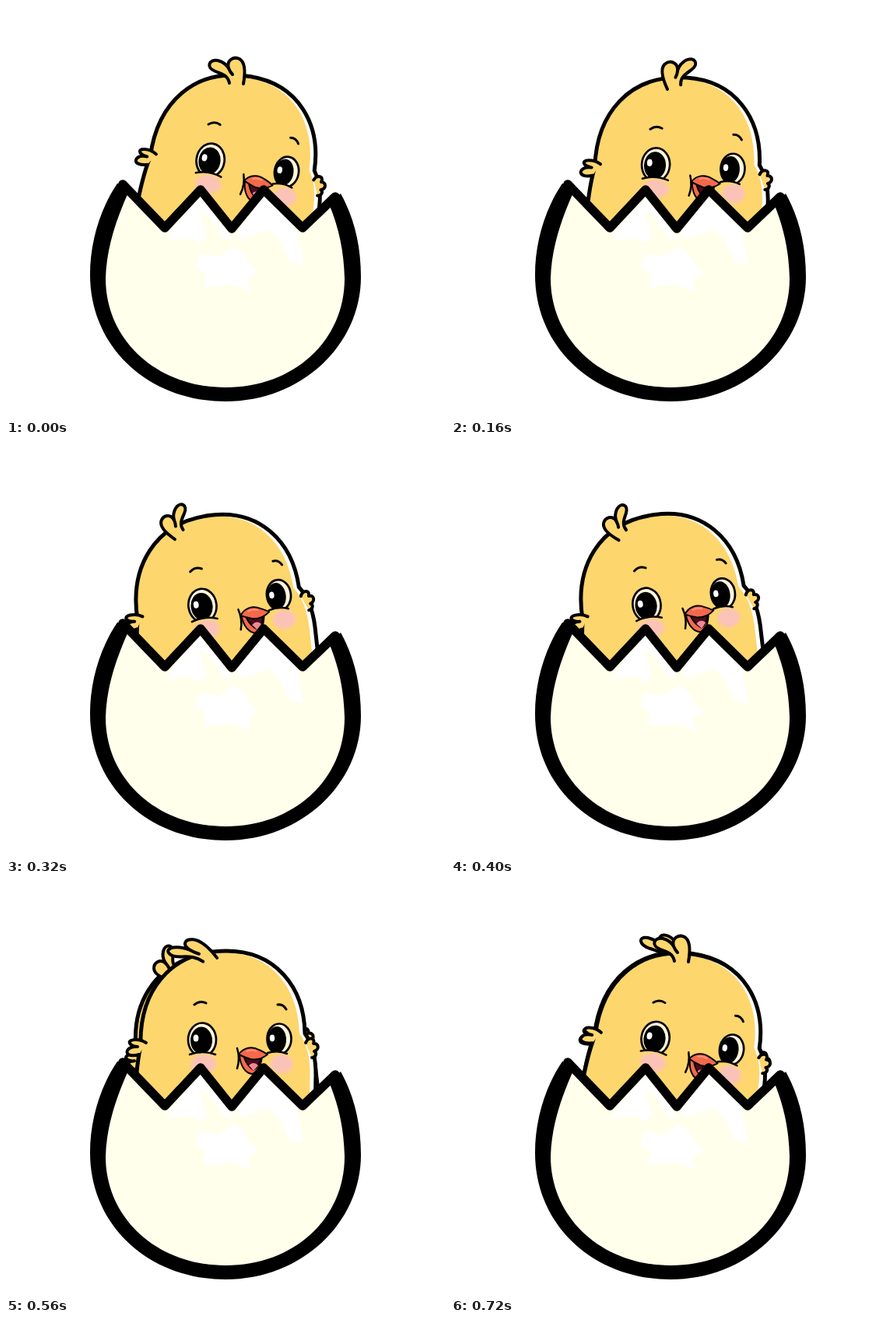
These frames come from a looping animation (564x528 px, 0.76 s). An HTML page without scripts:

```html
<!DOCTYPE html>
<html lang="en">
<head>
<meta charset="utf-8">
<title>Hatching chick</title>
<style>
  html, body { margin: 0; width: 100%; height: 100%; overflow: hidden; background: #fff; }
  svg { display: block; width: 100vw; height: 100vh; }
  .line { fill: none; stroke: #000; stroke-linecap: round; stroke-linejoin: round; }
  .feather { fill: #fed66e; stroke: #000; stroke-width: 4; stroke-linecap: round; stroke-linejoin: round; }
  .feather path { vector-effect: non-scaling-stroke; }

  /* Returning poses linger behind the next one for a moment. */
  .pose { visibility: hidden; animation: plain 760ms step-end calc(var(--at) - 760ms) infinite; }
  .linger { animation-name: linger; }
  .last { animation-name: last; }
  @keyframes plain { 0% { visibility: visible } 10.5263%, 100% { visibility: hidden } }
  @keyframes linger { 0% { visibility: visible } 15.7895%, 100% { visibility: hidden } }
  @keyframes last { 0% { visibility: visible } 5.2632%, 100% { visibility: hidden } }
</style>
</head>
<body>
<svg viewBox="0 0 564 528">
  <defs>
    <radialGradient id="blush">
      <stop offset=".6" stop-color="#fbc3b8"/>
      <stop offset="1" stop-color="#fbc3b8" stop-opacity="0"/>
    </radialGradient>

    <path id="outline" d="M-136 100C-134 50-133 30-128 8C-130-60-92-114-18-114C45-114 82-68 83-8C92 5 97 20 97 45L96 100Z"/>

    <!-- Body and face share the midpoint between the eyes as origin. -->
    <g id="body">
      <use href="#outline" fill="#fff"/>
      <use href="#outline" fill="#fed66e" transform="translate(-4.2) scale(.967 .985)"/>
      <use href="#outline" class="line" stroke-width="5"/>
      <g class="feather" stroke-width="3.5">
        <path d="M-121 4C-130-2-147-1-141 6Q-137 9-132 9C-145 8-150 18-141 20Q-136 21-130 19"/>
        <path d="M84 4C87-4 97-3 94 5C101 4 102 13 95 15C99 17 97 23 92 23"/>
      </g>
    </g>

    <g id="tuft" class="feather">
      <path d="M-10 2C-12-8-20-10-28-13C-41-18-36-29-25-27Q-16-25-11-17C-14-27-5-33 3-29C10-25 11-14 8 3"/>
      <path d="M-11-17Q-9-12-6-9" fill="none"/>
    </g>

    <g id="face">
      <path class="line" stroke-width="3" d="M-59-45Q-52-51-44-47M48-45Q55-46 59-39"/>
      <g id="eyes">
        <ellipse cx="-49" cy="0" rx="18" ry="21.5" fill="#fff6dc" stroke="#000" stroke-width="2.7"/>
        <ellipse cx="-50" cy="1" rx="14" ry="17.5"/>
        <ellipse cx="-57" cy="-2" rx="3.4" ry="4.6" fill="#fff"/>
        <ellipse cx="50" cy="-1" rx="15.5" ry="19.5" fill="#fff6dc" stroke="#000" stroke-width="2.7"/>
        <ellipse cx="47" cy="0" rx="12" ry="17"/>
        <ellipse cx="41" cy="-2" rx="3.2" ry="4.4" fill="#fff"/>
      </g>
      <path d="M-66 20Q-49 14-31 20V27H-64ZM33 19Q48 13 64 18V27H34Z" fill="#fed66e"/>
      <ellipse cx="-47" cy="31" rx="20" ry="15" fill="url(#blush)"/>
      <ellipse cx="53" cy="31" rx="18" ry="15" fill="url(#blush)"/>
      <path class="line" stroke-width="2.5" d="M-65 19Q-49 13-32 19M35 17Q48 13 60 18"/>
      <g stroke="#000" stroke-width="2" stroke-linejoin="round">
        <path d="M-1 20C0 33 6 43 15 44Q25 42 28 22Z" fill="#f4694b"/>
        <path d="M5 23Q9 34 17 39Q25 34 27 22Z" fill="#4c0c18"/>
        <path d="M11 33Q17 27 23 33L17 40Z" fill="#ef8998" stroke="none"/>
        <path d="M-2 19C4 10 15 8 24 13Q31 16 35 19Q25 27 13 25Q4 22-2 19Z" fill="#f4694b"/>
        <path d="M8 15Q14 12 21 15" fill="none" stroke="#fb927a"/>
      </g>
      <path class="line" stroke-width="2.5" d="M-4 11Q0 24-4 37"/>
    </g>
  </defs>

  <g class="pose" style="--at:0ms">
    <use href="#body" transform="translate(313 206) rotate(9.3)"/>
    <use href="#tuft" transform="translate(297 97)"/>
    <use href="#face" transform="translate(311 206) rotate(9.3)"/>
  </g>
  <g class="pose" style="--at:80ms">
    <use href="#body" transform="translate(313 206) rotate(7.5)"/>
    <use href="#tuft" transform="translate(292 98) rotate(28)"/>
    <use href="#face" transform="translate(312 206) rotate(7.5)"/>
  </g>
  <g class="pose" style="--at:160ms">
    <use href="#body" transform="translate(313 207) rotate(3.7)"/>
    <use href="#tuft" transform="translate(285 102) rotate(-15) scale(-1 1)"/>
    <use href="#face" transform="translate(312 207) rotate(3.7)"/>
  </g>
  <g class="pose" style="--at:240ms">
    <use href="#body" transform="translate(304 203) rotate(-2.5)"/>
    <use href="#tuft" transform="translate(249 104) rotate(-31) scale(-.95 .95)"/>
    <use href="#face" transform="translate(307 203) rotate(-2.5)"/>
  </g>
  <g class="pose" style="--at:320ms">
    <use href="#body" transform="translate(295 201) rotate(-7.3)"/>
    <use href="#tuft" transform="translate(220 114) rotate(-46) scale(-.9 .9)"/>
    <use href="#face" transform="translate(301 200) rotate(-7.3)"/>
  </g>
  <g class="pose linger" style="--at:400ms">
    <use href="#body" transform="translate(295 200) rotate(-7.8)"/>
    <use href="#tuft" transform="translate(218 115) rotate(-51) scale(-.9 .9)"/>
    <use href="#face" transform="translate(300 198.5) rotate(-7.8)"/>
  </g>
  <g class="pose linger" style="--at:480ms">
    <use href="#body" transform="translate(294.5 200) rotate(-8)"/>
    <use href="#tuft" transform="translate(215 117) rotate(-66) scale(-.9 .9)"/>
    <use href="#face" transform="translate(299.5 197.5) rotate(-8)"/>
  </g>
  <g class="pose linger" style="--at:560ms">
    <use href="#body" transform="translate(301 200)"/>
    <use href="#tuft" transform="translate(261 95) rotate(-18) skewX(28)"/>
    <use href="#face" transform="translate(301 200)"/>
  </g>
  <g class="pose linger" style="--at:640ms">
    <use href="#body" transform="translate(312 205) rotate(8.2)"/>
    <use href="#tuft" transform="translate(290 96) skewX(25)"/>
    <use href="#face" transform="translate(310 205) rotate(8.2)"/>
  </g>
  <g class="pose last" style="--at:720ms">
    <use href="#body" transform="translate(313 206) rotate(9.1)"/>
    <use href="#tuft" transform="translate(297 97)"/>
    <use href="#face" transform="translate(311 206) rotate(9.1)"/>
  </g>

  <g id="shell">
    <path d="M143 228C120 262 108 305 108 345C108 440 185 508 282 508C380 508 456 435 456 348C456 305 446 270 430 241L381 285L331 236L290 287L250 236L204 285L150 229Z"/>
    <path fill="#ffffeb" d="M157 240C139 280 129 315 128 350C128 430 195 490 282 490C370 490 435 430 435 350C434 315 428 285 414 252L381 285L331 236L290 287L250 236L204 285Z"/>
    <path fill="#fff" d="M250 245L285 290L292 301L280 299L262 272L248 262L258 296L249 305L238 298L207 301L217 283Z
      M331 245L373 284L382 332L364 328L352 301L338 288L318 294L301 300L296 290Z
      M248 318L272 322L292 309L305 316L313 332L325 343L310 351L315 367L290 358L254 361L256 343L244 336Z"/>
    <path class="line" stroke-width="11.5" d="M150 229L204 285L250 236L290 286L331 236L381 285L423 245"/>
  </g>
</svg>
</body>
</html>
```
